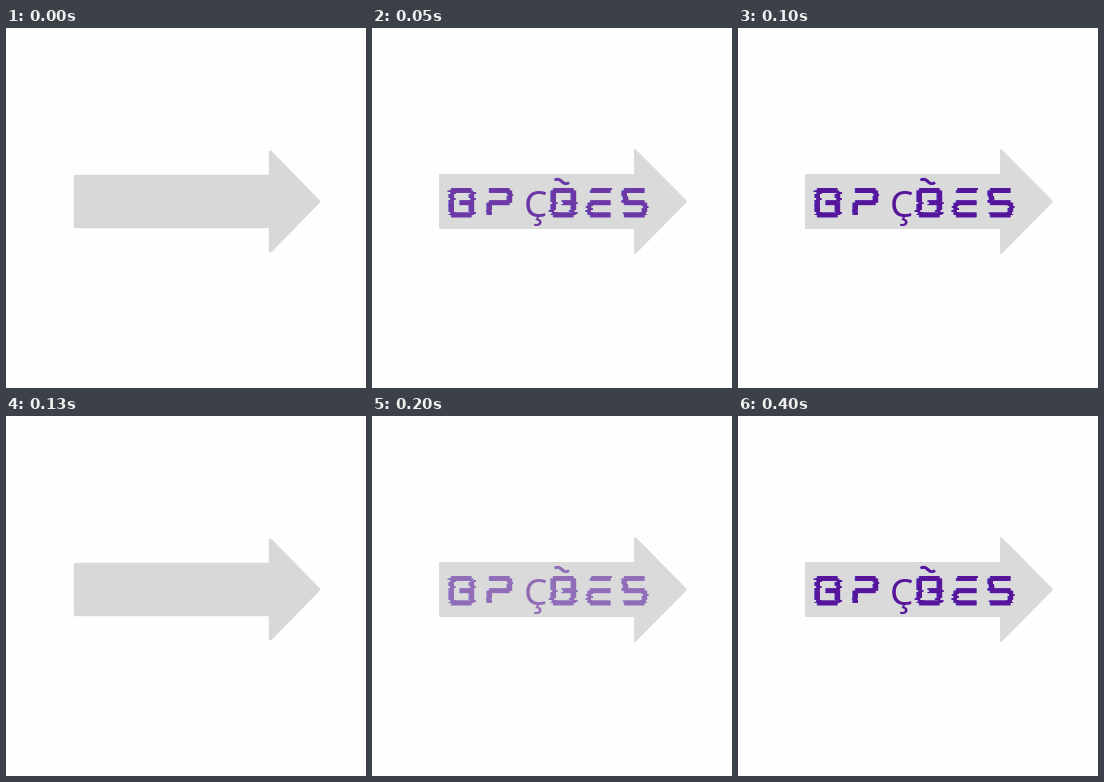
These frames come from a looping animation (360x360 px, 0.51 s). An HTML page with a canvas:

```html
<!DOCTYPE html>
<html lang="pt">
<head>
<meta charset="utf-8">
<title>Opções</title>
<style>
html, body { margin: 0; width: 100%; height: 100%; overflow: hidden; background: #fefefe; }
canvas { display: block; }
</style>
</head>
<body>
<canvas id="stage" width="360" height="360" role="img" aria-label="OPÇÕES"></canvas>
<script>
const ctx = document.getElementById('stage').getContext('2d');
const LOOP = 510, INK = '#56159b';
const WIDTH = 25, TOP = 162.5, GAP = 12.2, BAR = 4.8;

// flicker: when each state begins and how strong the word is
const steps = [
  { at: 0, alpha: 0 },
  { at: 30, alpha: 0.82 },
  { at: 70, alpha: 0.2 },
  { at: 100, alpha: 1 },
  { at: 130, alpha: 0 },
  { at: 200, alpha: 0.55 },
  { at: 230, alpha: 1 }
];

// parts: t/m/b bars, h half middle bar, l/r upper posts, L/R lower posts
const glyphs = [
  { x: 77, parts: 'tbhlrLR' },
  { x: 115, parts: 'tmrL' },
  { x: 179, parts: 'tbhlrLR', tilde: true },
  { x: 216, parts: 'tmbL' },
  { x: 250, parts: 'tmblR' }
];

function hash(n) {
  const v = Math.sin(n * 12.9898) * 43758.5453;
  return v - Math.floor(v);
}

function drawGlyph(g, { x, parts, tilde }) {
  const bar = (row, from = 2.5) =>
    g.fillRect(x + from, TOP + row * GAP - BAR / 2, WIDTH - from - 2.5, BAR);
  const post = (side, row) =>
    g.fillRect(x + side * (WIDTH - BAR), TOP + row * GAP, BAR, GAP);
  const draw = {
    t: () => bar(0), m: () => bar(1), b: () => bar(2), h: () => bar(1, 11),
    l: () => post(0, 0), r: () => post(1, 0), L: () => post(0, 1), R: () => post(1, 1)
  };
  for (const p of parts) draw[p]();
  if (!tilde) return;
  g.beginPath();
  for (let u = 0; u <= 1; u += 0.1) {
    g.lineTo(x + 4 + 14 * u, 152.2 + 2.5 * u - 1.6 * Math.sin(u * Math.PI * 2));
  }
  g.stroke();
}

// each glyph is cut into thin strips, some pushed sideways
function letters(g, color, dx) {
  g.fillStyle = g.strokeStyle = color;
  g.lineWidth = 2.6;
  glyphs.forEach((glyph, k) => {
    for (let y = 148; y < 192; y += 2) {
      const seed = k * 100 + y;
      const push = hash(seed) < 0.35 ? (hash(seed + 0.5) - 0.5) * 5 : 0;
      g.save();
      g.beginPath();
      g.rect(0, y, 360, 2);
      g.clip();
      g.translate(dx + push, 0);
      drawGlyph(g, glyph);
      g.restore();
    }
  });
}

function makeWord() {
  const layer = document.createElement('canvas');
  layer.width = layer.height = 360;
  const g = layer.getContext('2d');
  letters(g, '#4a35c4', -0.7);
  letters(g, INK, 0.2);
  g.font = '37px "Noto Sans", sans-serif';
  g.fillText('Ç', 152, 189);
  return layer;
}

const word = makeWord();

function arrow(inset) {
  const left = 67 + inset, tip = 315 - inset, neck = 262 + inset;
  const mid = 173.5, half = 27.5 - inset, wing = 52.5 - inset * 2;
  const r = 1 + inset;
  ctx.fillStyle = ctx.strokeStyle = inset ? '#d8d8d8' : '#dadada';
  ctx.lineWidth = r * 2;
  ctx.lineJoin = 'round';
  ctx.beginPath();
  ctx.moveTo(tip - r, mid);
  ctx.lineTo(neck + r, mid - wing + r);
  ctx.lineTo(neck + r, mid - half + r);
  ctx.lineTo(left + r, mid - half + r);
  ctx.lineTo(left + r, mid + half - r);
  ctx.lineTo(neck + r, mid + half - r);
  ctx.lineTo(neck + r, mid + wing - r);
  ctx.closePath();
  ctx.fill();
  ctx.stroke();
}

function draw(ms) {
  const t = ms % LOOP;
  const { alpha } = steps.findLast(s => t >= s.at);
  ctx.fillStyle = '#fefefe';
  ctx.fillRect(0, 0, 360, 360);
  arrow(alpha ? 0 : 0.8);
  ctx.globalAlpha = alpha;
  ctx.drawImage(word, 0, 0);
  ctx.globalAlpha = 1;
}

const start = performance.now();
function tick() {
  draw(performance.now() - start);
  requestAnimationFrame(tick);
}
tick();
</script>
</body>
</html>
```
